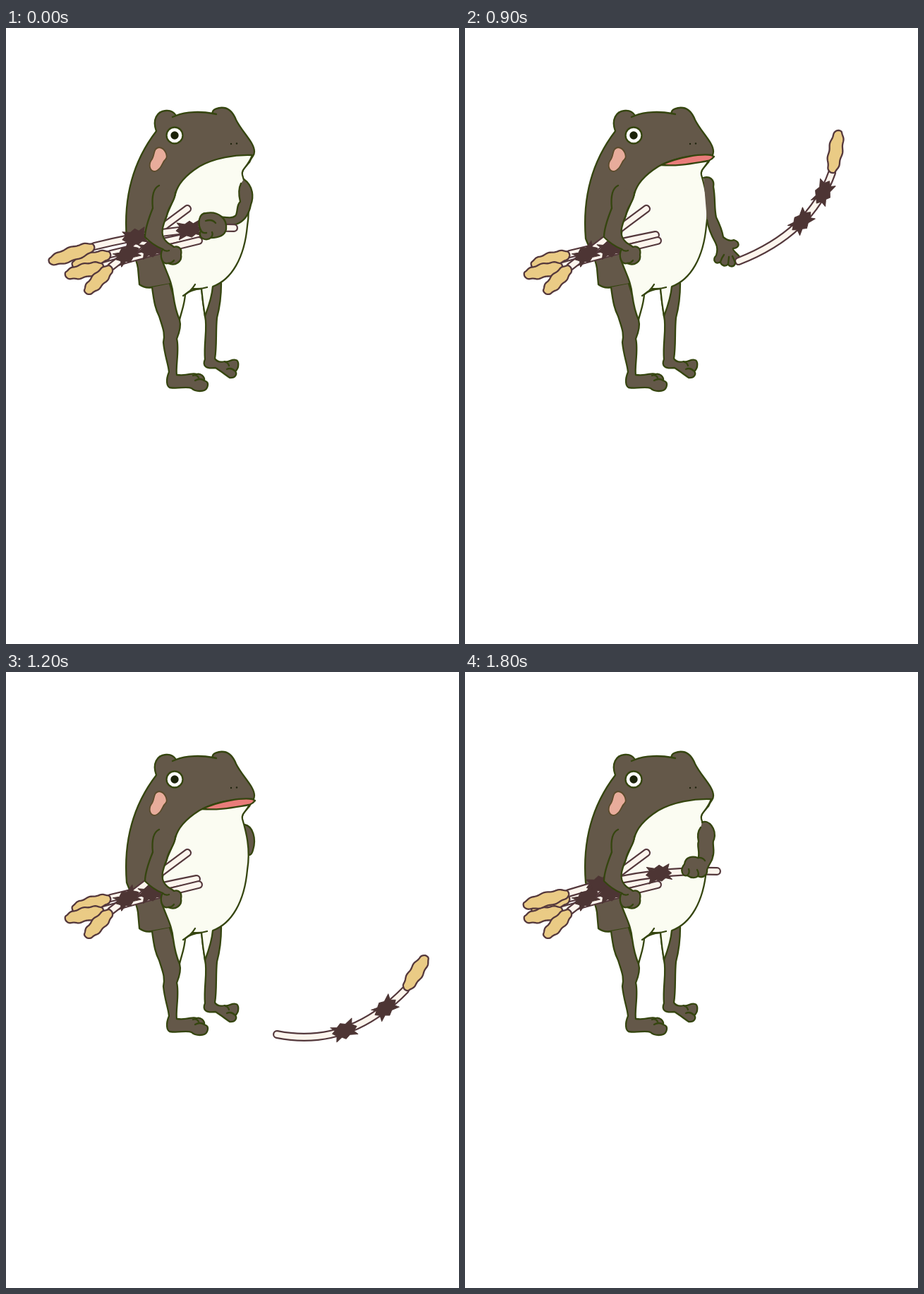
An HTML page with a canvas for the animation above (1.9 s loop, 642 by 872 pixels).

```html
<!DOCTYPE html>
<html>
<head>
<meta charset="utf-8">
<style>
html, body { margin: 0; width: 100%; height: 100%; overflow: hidden; background: #fff; }
canvas { display: block; }
</style>
</head>
<body>
<canvas id="stage" width="642" height="872"></canvas>
<script>
const ctx = document.getElementById('stage').getContext('2d');
const LINE = '#35450f', SKIN = '#645849', BELLY = '#fbfcf2', TWIG = '#54383c', STEM = '#fcf5ed';

const parts = {
  rightLeg: 'M277 368C279 390 281 400 282 408C286 425 280 445 282 469C278 478 283 483 297 481C305 486 311 491 317 495C325 496 328 490 325 486C331 481 330 471 326 470C320 468 315 474 310 472C302 474 298 471 296 468C299 450 297 430 299 410C303 395 305 380 305 361',
  leftLeg: 'M207 367C210 390 212 398 217 408C222 424 226 432 223 445C225 465 230 475 231 487C226 499 228 507 232 509C244 511 256 507 263 510C268 515 282 516 285 509C288 502 284 500 281 499C282 494 276 488 270 490C263 487 260 493 242 491C240 480 246 455 242 440C247 428 248 420 246 413L237 378L232 362',
  toes: 'M265 492Q270 490 273 495M268 499Q275 495 281 499M311 473Q315 474 316 478M313 483Q319 480 325 486',
  body: 'M213 146C207 130 214 118 226 117C233 116 238 119 241 124C255 118 278 118 293 121C291 115 302 112 309 113C317 114 322 120 326 130C335 148 352 162 352 175C352 182 349 180 345 190L336 200L293 366L235 362L207 367Q197 369 189 363L187 340C185 325 176 312 171 298C166 235 183 185 213 146Z',
  belly: 'M349 180C325 179 295 184 274 196C255 208 243 222 240 235C236 248 230 258 228 265C221 285 219 310 221 328C228 348 235 358 237 378Q240 400 246 413C249 400 253 392 254 377Q262 370 277 369C279 390 280 396 282 408C288 392 292 380 293 366C320 356 338 325 342 280C347 250 340 225 335 208C333 199 343 197 349 180Z',
  crotch: 'M251 379Q262 373 268 363M265 369Q275 370 285 367',
  mouth: 'M278 194C303 182 335 178 349 180L353 182Q350 186 345 188C325 191 303 196 278 194Z',
  blush: 'M217 169C226 170 230 182 226 186C221 190 221 200 211 203C203 203 202 193 206 187C211 182 208 170 217 169Z',
  bump: 'M293 121L298 122M241 124L236 126',
  leftArm: 'M217 223C206 228 207 245 208 255C202 270 197 285 197 296C205 304 214 310 222 313C217 322 221 336 230 333C240 338 250 330 248 321C250 312 244 308 238 310C233 306 230 306 226 301C218 292 222 280 228 265C230 252 240 245 240 233',
  leftFingers: 'M222 313Q226 317 231 315M230 333Q235 333 238 329'
};

const limbs = {
  hold: {
    arm: 'M337 214C351 224 351 240 347 250C344 266 337 274 326 278L306 279L302 267C312 268 320 270 325 266C329 262 326 251 332 246C330 238 329 228 333 220',
    hand: 'M284 262C272 262 272 278 276 286C271 299 285 302 290 297C300 297 310 294 312 285C314 270 301 259 284 262Z',
    lines: 'M276 286Q278 291 284 290M283 273Q292 270 297 276M290 297Q294 293 292 289'
  },
  pull: {
    arm: 'M336 213C345 208 357 222 353 237C349 241 355 252 351 262L330 266C334 255 328 247 331 240Q328 228 334 220',
    hand: 'M330 263C322 260 312 262 311 272C304 280 308 290 315 288C322 293 328 291 330 289C338 293 344 286 343 280C346 270 352 267 351 260',
    lines: 'M315 288Q319 284 317 279M330 289Q332 285 329 280M330 263Q337 262 340 267'
  },
  swing: {
    arm: 'M338 212C350 212 360 225 362 233C375 245 381 255 388 267L378 286C371 276 367 280 366 272C355 265 344 250 340 240',
    hand: 'M387 267C395 262 402 267 406 272C416 282 416 300 408 307C398 311 390 306 385 303C375 304 371 290 378 286C386 280 385 274 387 267Z',
    lines: 'M378 286Q386 288 386 294M385 303Q392 303 393 297'
  },
  open: {
    arm: 'M338 212C346 209 354 214 352 225C355 240 353 255 356 268C362 280 365 290 366 296C372 301 376 302 381 300C390 303 390 311 380 312C378 316 392 322 392 330C390 337 385 335 383 332C382 340 374 338 373 334C368 340 362 334 362 331C355 336 350 328 356 322C358 316 358 310 355 304C350 295 345 285 343 272',
    lines: 'M362 331Q364 325 367 321M373 334L374 324M383 332L379 323'
  },
  back: { arm: 'M338 216C350 218 355 236 350 252C348 260 344 260 342 257' }
};

// Stick: tail, control, head joint and tip points, then the band positions.
const bundle = [
  [270, 293, 210, 305, 148, 320, 94, 336],
  [273, 301, 210, 316, 138, 337, 84, 350],
  [257, 256, 204, 295, 149, 338, 113, 375]
];
const fallA = [375, 365, 481, 364, 543, 274, 564, 221, .54, .83];
const fallB = [384, 513, 485, 533, 566, 450, 596, 402, .5, .83];
const mid = fallA.map((v, i) => (v + fallB[i]) / 2);
const low = fallB.map((v, i) => i > 7 ? v : v + (i % 2 ? 117 : 9));

const rest = { limb: 'hold', stick: [323, 283, 240, 281, 125, 309, 61, 331, .36, .74] };
const draw = { limb: 'pull', stick: [357, 282, 255, 279, 147, 313, 83, 331, .4, .8] };
const lift = { limb: 'swing', stick: [425, 325, 330, 262, 215, 268, 152, 288, .45, .8], over: 1 };
const aim = { limb: 'swing', stick: [425, 326, 360, 229, 253, 215, 191, 245, .5, .82], over: 1, gape: 1 };
const raise = { limb: 'swing', stick: [402, 326, 400, 225, 372, 170, 338, 122, .5, .82], over: 1, gape: 1 };
const toss = { limb: 'open', stick: [388, 330, 490, 290, 520, 205, 530, 145, .54, .83], over: 1, gape: 1 };
const drop = (stick, limb = 'back') => ({ limb, stick, over: 1, gape: 1 });
const poses = [rest, draw, lift, aim, raise, toss, drop(fallA, 'open'), drop(mid), drop(fallB),
  drop(low), drop(null), raise, aim, lift, draw];

function shape(d, fill, line = LINE, width = 2.3) {
  const p = new Path2D(d);
  if (fill) { ctx.fillStyle = fill; ctx.fill(p); }
  ctx.strokeStyle = line;
  ctx.lineWidth = width;
  ctx.stroke(p);
}

function dot(x, y, r, fill, outlined) {
  ctx.beginPath();
  ctx.arc(x, y, r, 0, 7);
  ctx.fillStyle = fill;
  ctx.fill();
  if (outlined) { ctx.strokeStyle = LINE; ctx.lineWidth = 2.3; ctx.stroke(); }
}

function local(x, y, angle, paint) {
  ctx.save();
  ctx.translate(x, y);
  ctx.rotate(angle);
  paint();
  ctx.restore();
}

function band(x, y, angle) {
  local(x, y, angle, () => shape(
    'M-18-10L-9-7L-3-11L4-8L15-13L12-5L18 0L12 5L16 11L5 8L-2 12L-7 8L-16 12L-13 4L-18-1L-13-4Z',
    '#4d3534', '#4d3534', 1));
}

function ear(x0, y0, x1, y1) {
  const half = Math.hypot(x1 - x0, y1 - y0) / 2;
  local(x0, y0, Math.atan2(y1 - y0, x1 - x0), () => {
    ctx.beginPath();
    for (let i = 0; i <= 80; i++) {
      const a = i / 40 * Math.PI;
      const bump = 1 + .08 * Math.sin(9 * a);
      ctx.lineTo(half * (1 + Math.cos(a)), 9.5 * Math.sign(Math.sin(a)) * Math.abs(Math.sin(a)) ** .75 * bump);
    }
    ctx.fillStyle = '#eacb85';
    ctx.fill();
    ctx.strokeStyle = TWIG;
    ctx.lineWidth = 2.3;
    ctx.stroke();
  });
}

function drawStick([x0, y0, cx, cy, x1, y1, hx, hy, ...bands]) {
  const stem = `M${x0} ${y0}Q${cx} ${cy} ${x1} ${y1}`;
  shape(stem, null, TWIG, 12);
  shape(stem, null, STEM, 7.6);
  ear(x1, y1, hx, hy);
  for (const t of bands) {
    const u = 1 - t, at = (a, b, c) => u * u * a + 2 * u * t * b + t * t * c;
    band(at(x0, cx, x1), at(y0, cy, y1),
      Math.atan2(u * (cy - y0) + t * (y1 - cy), u * (cx - x0) + t * (x1 - cx)));
  }
}

function drawFrog({ limb, stick, over, gape }) {
  const { arm, hand, lines } = limbs[limb];
  if (limb === 'back') shape(arm, SKIN);
  shape(parts.rightLeg, SKIN);
  shape(parts.body, SKIN);
  shape(parts.leftLeg, SKIN);
  shape(parts.toes);
  shape(parts.belly, BELLY);
  shape(parts.crotch);
  shape(parts.bump);
  if (gape) shape(parts.mouth, '#e97c7a');
  shape(parts.blush, '#e8ac9b', '#5b4b2c', 1.8);
  dot(239, 152, 11.5, '#fff', true);
  dot(239, 152, 5.7, '#1b220a');
  dot(319, 164, 1.2, '#20240f');
  dot(327, 163.5, 1.2, '#20240f');
  if (limb !== 'back') shape(arm, SKIN);
  bundle.forEach(drawStick);
  if (stick && !over) drawStick(stick);
  band(172, 320, -.5);
  band(207, 312, -.25);
  shape(parts.leftArm, SKIN);
  shape(parts.leftFingers);
  if (stick && over) drawStick(stick);
  if (hand) shape(hand, SKIN);
  if (lines) shape(lines);
}

const start = performance.now();
function frame() {
  const t = (performance.now() - start) % 1900;
  ctx.clearRect(0, 0, 642, 872);
  ctx.lineCap = ctx.lineJoin = 'round';
  drawFrog(poses[t < 500 ? 0 : Math.floor((t - 400) / 100)]);
  requestAnimationFrame(frame);
}
frame();
</script>
</body>
</html>
```
